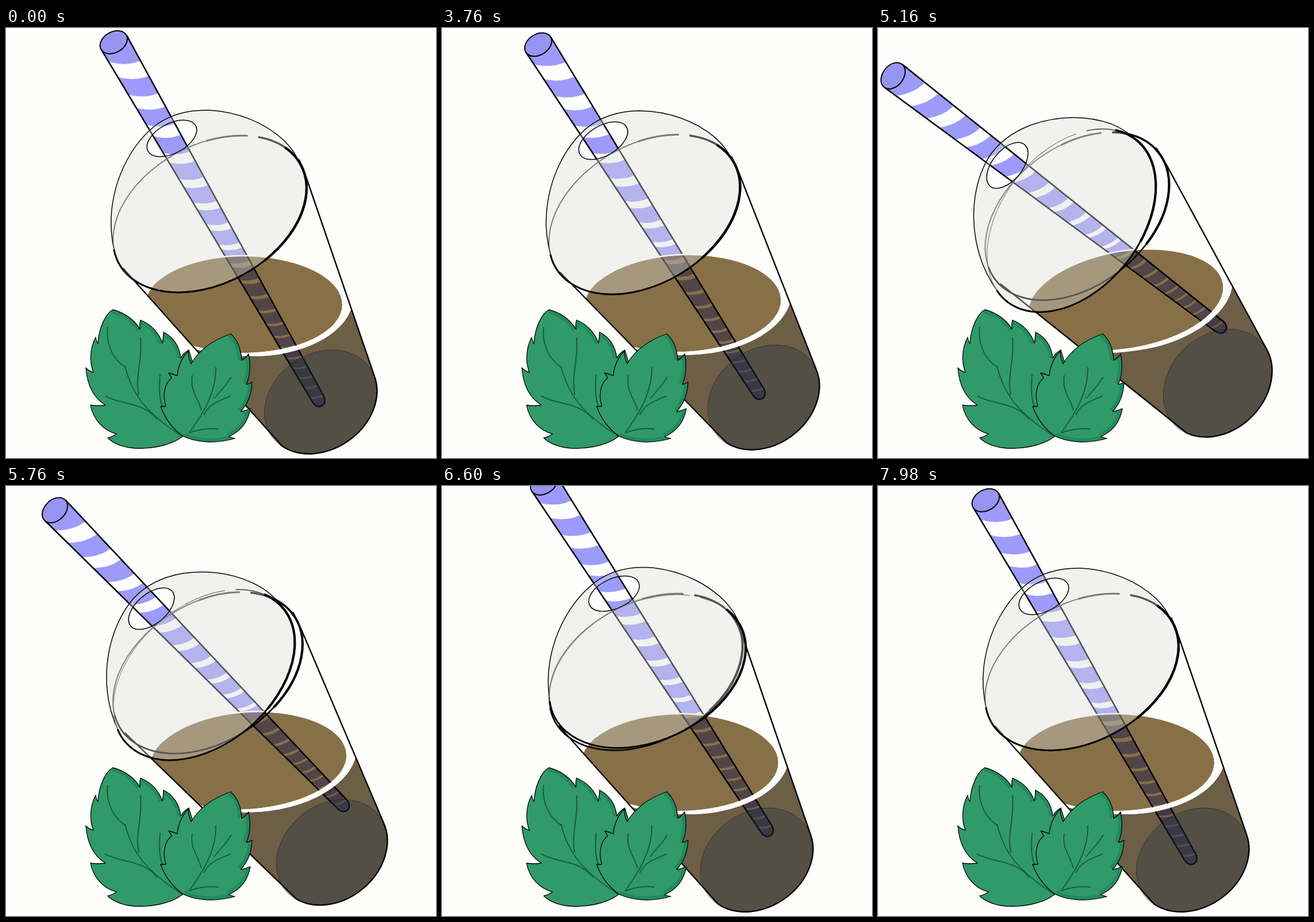
These frames come from a looping animation (748x748 px, 8 s). An HTML page with a canvas:

```html
<!DOCTYPE html>
<html lang="en">
<head>
<meta charset="utf-8">
<title>Iced drink</title>
<style>
  html, body { margin: 0; width: 100%; height: 100%; overflow: hidden; background: #fdfdfb; }
  canvas { display: block; width: 100vw; height: 100vh; }
</style>
</head>
<body>
<canvas id="stage" width="748" height="748"></canvas>
<script>
const ctx = document.getElementById('stage').getContext('2d');
const LOOP = 8000, START = 2780, MID = 374, RAD = Math.PI / 180;
const INK = '#050505', PAPER = '#fdfdfb', PURPLE = '#9c9bfa', SURFACE = '#887148', WALL = '#6e5f47';

// Keys: [frame, value, power of the curve leading to it]
const PEAK = 51.5;
const cupTurn = [[0, 0], [PEAK, 9.7, 1.5], [75, 0]];
const lidTurn = [[0, 0], [PEAK, 23.2, 2.46], [84, -4.2], [112, 0]];
const strawTurn = [[0, 0], [PEAK, 23.2, 2.46], [84, 2.3], [112, 0]];
const strawX = [[0, 0], [PEAK, -42, 2.46], [84, 9.3], [112, 0]];
const strawY = [[0, 0], [PEAK, -41.5, 2.46], [84, -39.5], [112, 0]];

function at(keys, f) {
  for (let i = 1; i < keys.length; i++) {
    const [f0, v0] = keys[i - 1], [f1, v1, power = 1] = keys[i];
    if (f < f1) return v0 + (v1 - v0) * Math.pow((f - f0) / (f1 - f0), power);
  }
  return keys[keys.length - 1][1];
}

// Three drawings every 140 ms: two short ones, then a long hold
function frameAt(t) {
  if (t < START) return 0;
  const r = t - START, m = r % 140;
  return 3 * Math.floor(r / 140) + (m < 20 ? 0 : m < 40 ? 1 : 2);
}

function pose(deg, x = 0, y = 0) {
  ctx.setTransform(1, 0, 0, 1, MID + x, MID + y);
  ctx.rotate(-deg * RAD);
  ctx.translate(-MID, -MID);
}

function line(path, width, color = INK) {
  ctx.lineWidth = width;
  ctx.strokeStyle = color;
  ctx.stroke(path);
}

function fill(path, color, rule) {
  ctx.fillStyle = color;
  ctx.fill(path, rule || 'nonzero');
}

function scoped(draw) {
  ctx.save();
  draw();
  ctx.restore();
}

// ---- Cup ----
const body = new Path2D('M205 420L480 727A104 83 -35 0 0 641 606L510 229Z');
const sides = new Path2D('M203 417L480 727M510 229L523 262L641 606');
const foot = new Path2D('M480 727A104 83 -35 0 0 641 606');
const base = new Path2D();
base.ellipse(547, 650.5, 104, 83, -35 * RAD, 0, 7);
const surface = new Path2D();
surface.ellipse(414, 481, 171, 84, 0, 0, 7);
const surfaceTop = new Path2D();
surfaceTop.ellipse(414, 481, 172, 85, 0, 3.7, 6.28);
const shore = 'M602 482C592 530 520 571 430 571C395 571 360 568 328 558';
const wall = new Path2D(shore + 'L328 760L720 760L720 482Z');
const crescent = new Path2D(shore);
crescent.ellipse(414, 481, 171, 84, 0, 2.08, 0, true);
crescent.closePath();

function rim(path, from, to) {
  path.ellipse(354.5, 323.5, 180, 120.5, -28.5 * RAD, from * RAD, to * RAD);
  return path;
}
const rimArc = (from, to) => rim(new Path2D(), from, to);
const rimBack = rimArc(190, 290), rimTop = rimArc(288, 313);
const rimTail = rimArc(-40, -3), rimRight = rimArc(-5, 69), rimFront = rimArc(69, 192);
const lidTail = rimArc(-40, -18), lidRight = rimArc(-19, 75), lidFront = rimArc(74, 192);

// ---- Lid ----
const domeCurve = 'M189 390C183 365 181 340 184 315C191 255 220 200 262 168' +
  'C290 148 322 142 354 143C405 146 450 165 483 195C495 207 503 217 508 230';
const domeLine = new Path2D(domeCurve);
const hole = new Path2D();
hole.ellipse(288.5, 192, 47, 26, -28 * RAD, 0, 7);
const dome = rim(new Path2D(domeCurve), -4, 190);
dome.closePath();
dome.addPath(hole);

// ---- Straw, in its own axis: y runs down its length ----
const AXIS = -29.6 * RAD, END = 716;
const half = s => 25.3 - 14.3 * s / END;
const mid = s => 0.6 + 2.5 * s / END;
const strawBody = new Path2D();
strawBody.moveTo(mid(0) - half(0), 0);
strawBody.lineTo(mid(END) - half(END), END);
strawBody.bezierCurveTo(-7, END + 17, 13, END + 17, mid(END) + half(END), END);
strawBody.lineTo(mid(0) + half(0), 0);
const strawMouth = new Path2D();
strawMouth.ellipse(0.4, 0, 25.3, 18, 0, 0, 7);

function band(path, s, length) {
  const w = 2 * half(Math.max(s, 0)), e = w / 2 + 4, slant = 0.62 * w, dip = slant / 2 + 0.32 * w;
  path.moveTo(-e, s);
  path.quadraticCurveTo(0, s + dip, e + 4, s + slant);
  path.lineTo(e + 4, s + slant + length);
  path.quadraticCurveTo(0, s + dip + length, -e, s + length);
  path.closePath();
}
const bands = new Path2D();
band(bands, -50, 70);
for (let s = 51, period; s < 715; s += period) {
  period = Math.max(20, 66 - 0.075 * s);
  band(bands, s, period * (0.53 + 0.27 * Math.min(1, s / 500)));
}

function drawStraw(f) {
  pose(at(strawTurn, f), at(strawX, f), at(strawY, f));
  ctx.translate(187, 25);
  ctx.rotate(AXIS);
  fill(strawBody, '#fdfdfd');
  scoped(() => {
    ctx.clip(strawBody);
    fill(bands, PURPLE);
  });
  line(strawBody, 2.6);
  fill(strawMouth, '#9594f0');
  line(strawMouth, 2);
}

function drawCup(f) {
  pose(at(cupTurn, f));
  scoped(() => {
    ctx.clip(body);
    ctx.globalCompositeOperation = 'multiply';
    fill(surface, SURFACE);
    fill(wall, WALL);
    ctx.globalCompositeOperation = 'source-over';
    fill(crescent, PAPER);
    line(surfaceTop, 2.6, PAPER);
  });
  fill(base, 'rgba(37,54,68,.35)');
  line(base, 1, 'rgba(30,30,30,.55)');
  line(sides, 2.4);
  line(foot, 2.4);
  line(rimBack, 2, '#555');
  line(rimTop, 3, '#444');
  line(rimTail, 3.4);
  line(rimRight, 4.2);
  line(rimFront, 2.6);
}

function drawLid(f) {
  pose(at(lidTurn, f));
  fill(dome, 'rgba(220,220,218,.37)', 'evenodd');
  line(domeLine, 1.5);
  line(hole, 1.5);
  line(rimBack, 1, '#777');
  line(rimTop, 1.2, '#777');
  line(lidTail, 1.8, '#555');
  line(lidRight, 4.2);
  line(lidFront, 3);
}

// ---- Mint ----
const leaves = [
  {
    shape: 'M186 490C206 495 224 508 233 524Q232 515 234 508C252 515 266 530 272 548Q274 538 274 529' +
      'C290 537 302 553 304 574Q309 565 318 560L330 600L308 710C285 728 245 734 215 730Q190 726 177 713' +
      'Q186 711 192 706C170 700 152 682 147 656Q160 658 173 656C152 643 141 620 139 591Q144 597 152 599' +
      'C144 578 147 555 156 538Q157 545 160 549C161 525 172 497 186 490Z',
    shade: 'M186 490C206 495 224 508 233 524M234 508C252 515 266 530 272 548M274 529C290 537 302 553 304 574',
    veins: 'M177 520C173 548 185 575 207 590M234 538C238 575 224 605 231 638M207 588C220 640 245 670 306 710' +
      'M172 640C205 657 238 650 263 681M268 603C267 625 265 645 274 662'
  },
  {
    shape: 'M391 532C402 542 409 558 410 578Q417 574 422 567C426 586 425 604 418 620Q424 619 428 616' +
      'C427 638 420 655 408 667Q417 666 425 662C421 686 408 702 387 711Q393 713 398 714C365 724 330 721 308 710' +
      'C288 696 276 678 269 658Q274 659 278 658C272 637 276 618 288 609Q286 604 283 600Q291 602 298 605' +
      'C299 588 307 572 317 562Q317 573 322 584C338 557 365 541 391 532Z',
    shade: 'M391 532C402 542 409 558 410 578M422 567C426 586 425 604 418 620M428 616C427 638 420 655 408 667' +
      'M425 662C421 686 408 702 387 711M398 714C365 724 330 721 308 710',
    veins: 'M365 590C366 632 345 668 318 705M324 604C320 632 334 642 340 665M391 640C368 650 353 654 344 673' +
      'M370 698C352 695 336 698 320 704M392 607C383 622 372 632 362 645'
  }
].map(leaf => Object.fromEntries(Object.entries(leaf).map(([key, d]) => [key, new Path2D(d)])));

function drawLeaves() {
  ctx.setTransform(1, 0, 0, 1, 0, 0);
  for (const { shape, shade, veins } of leaves) {
    fill(shape, '#319a69');
    scoped(() => {
      ctx.clip(shape);
      line(shade, 13, '#218b5c');
    });
    line(veins, 2.6, '#238457');
    line(veins, 0.9, '#0c3f28');
    line(shape, 1.3);
  }
}

function draw(t) {
  const f = frameAt(t);
  ctx.setTransform(1, 0, 0, 1, 0, 0);
  ctx.fillStyle = PAPER;
  ctx.fillRect(0, 0, 748, 748);
  drawStraw(f);
  drawCup(f);
  drawLid(f);
  drawLeaves();
}

const origin = performance.now();
function tick() {
  draw((performance.now() - origin) % LOOP);
  requestAnimationFrame(tick);
}
ctx.lineJoin = 'round';
tick();
</script>
</body>
</html>
```
